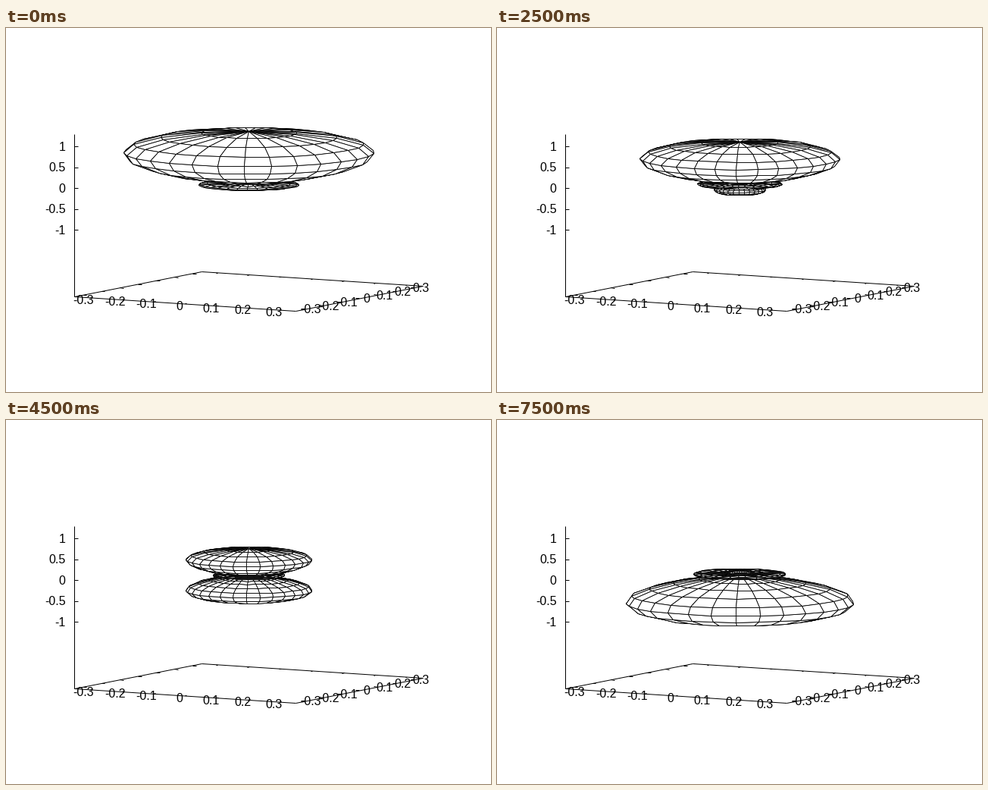
A matplotlib script for the animation above (8 s loop, 640 px wide and 480 px high).

```python
import numpy as np
import matplotlib.pyplot as plt
from matplotlib.animation import FuncAnimation
from matplotlib.collections import LineCollection, PolyCollection

W, H, DPI = 640, 480, 100
FRAMES, INTERVAL = 16, 500
PX = 72 / DPI                       # one pixel in points

XY_MAX, Z_MAX = 0.35, 1.3
ROT_X, ROT_Z = np.radians(80), np.radians(30)
SX, SY = 168.35, 108.65             # pixels per unit of the scaled cube
FLOOR = -2 * Z_MAX                  # base plane lies half a z range below
N = 30

plt.rcParams["font.family"] = "Liberation Sans"
fig = plt.figure(figsize=(W / DPI, H / DPI), dpi=DPI, facecolor="white")
ax = fig.add_axes([0, 0, 1, 1])
ax.set(xlim=(0, W), ylim=(H, 0))
ax.axis("off")


def project(x, y, z):
    """Screen position and nearness of a point in data units."""
    x, y = x / XY_MAX, y / XY_MAX
    z = 2 * (z - FLOOR) / (Z_MAX - FLOOR) - 1
    right = x * np.cos(ROT_Z) + y * np.sin(ROT_Z)
    back = y * np.cos(ROT_Z) - x * np.sin(ROT_Z)
    up = z * np.sin(ROT_X) + back * np.cos(ROT_X)
    near = z * np.cos(ROT_X) - back * np.sin(ROT_X)
    return W / 2 + 0.5 + SX * right, H / 2 + 0.5 - SY * up, near


def to_pixel(points):
    """Move points to the centres of their pixels."""
    return np.floor(points) + 0.5


def floor_point(x, y):
    return np.array(project(x, y, FLOOR)[:2])


def label(x, y, value, ha="center"):
    ax.text(x, y, f"{value:g}", ha=ha, va="baseline", fontsize=16 * PX)


def draw_axes():
    m, tic = XY_MAX, 0.03 * XY_MAX
    base = [floor_point(*p) for p in [(-m, -m), (m, -m), (m, m), (-m, m)]]
    lines = [[base[i - 1], base[i]] for i in range(4)]

    for v in np.arange(-3, 4) / 10:
        for s in (-1, 1):
            lines.append([floor_point(v, s * m), floor_point(v, s * (m - tic))])
            lines.append([floor_point(s * m, v), floor_point(s * (m - tic), v)])
        pad = 0 if v < 0 else 2     # room of the missing minus sign
        x, y = floor_point(v, -m)
        label(x - 9.3 + pad, y + 8, v)
        x, y = floor_point(m, v)
        label(x + 8 + 0.7 * pad, y + 5.5, v)

    x, top, _ = project(-m, -m, Z_MAX)
    lines.append([(x, top), base[0]])
    for v in (1, 0.5, 0, -0.5, -1):
        y = project(-m, -m, v)[1]
        lines.append([(x, y), (x + 5, y)])
        label(78.5, y + 5, v, "right")
    ax.add_collection(LineCollection(to_pixel(np.array(lines)), colors="black",
                                     linewidths=PX, snap=False))


theta, phi = np.meshgrid(np.linspace(0, np.pi, N),
                         np.linspace(0, 2 * np.pi, N), indexing="ij")
C = np.cos(theta)
Y10 = np.sqrt(3 / (4 * np.pi)) * C
Y20 = np.sqrt(5 / (16 * np.pi)) * (3 * C**2 - 1)


def corners(a):
    return np.stack([a[:-1, :-1], a[1:, :-1], a[1:, 1:], a[:-1, 1:]], -1).reshape(-1, 4)


def surface(phase):
    """Density of Y10 + Y20 exp(i phase) as quads, far to near."""
    r = Y10**2 + Y20**2 + 2 * Y10 * Y20 * np.cos(phase)
    rho = r * np.sin(theta)
    x, y, near = map(corners, project(rho * np.cos(phi), rho * np.sin(phi), r * C))
    order = np.argsort(near.mean(axis=1))
    return to_pixel(np.stack([x, y], -1)[order])


draw_axes()
mesh = PolyCollection([], facecolors="white", edgecolors="black", linewidths=0.85 * PX,
                      joinstyle="bevel", snap=False, zorder=3)
ax.add_collection(mesh, autolim=False)


def update(i):
    mesh.set_verts(surface(np.radians(9 * (i + 1))))
    return (mesh,)


anim = FuncAnimation(fig, update, frames=FRAMES, interval=INTERVAL,
                     repeat=True, repeat_delay=0)
plt.show()
```
